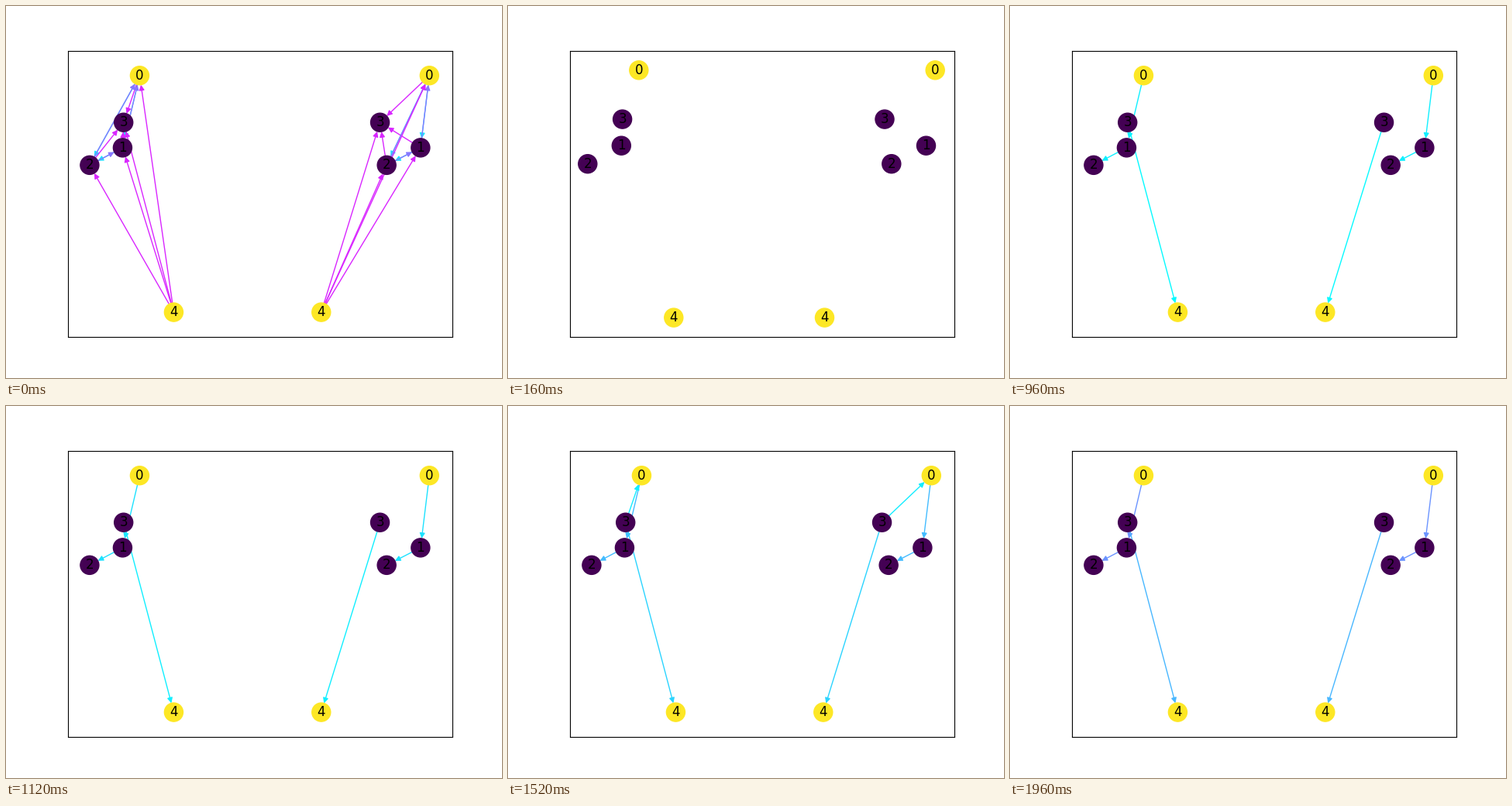
Recreate the animation shown at these times as a matplotlib script. Size 640 px wide and 480 px high, loop 2040 ms.

```python
from itertools import permutations

import numpy as np
import matplotlib.pyplot as plt
from matplotlib.animation import FuncAnimation
from matplotlib.patches import FancyArrowPatch

FRAMES, STEP = 51, 40
YELLOW, PURPLE = "#fde725", "#440154"
NODE_COLORS = [YELLOW, PURPLE, PURPLE, PURPLE, YELLOW]
NODE_SIZE = 300
FADE = 0.22
REGROW = 22

# Node positions in stage pixels, y pointing down
NODE_Y = [82.8, 180.2, 203.7, 146.1, 402.1]
GRAPHS = [np.column_stack([xs, NODE_Y]) for xs in (
    [168.8, 146.3, 102.8, 147.6, 213.8],
    [551.2, 539.5, 494.8, 486.0, 408.5],
)]


def start_strength(a, b):
    if a == 4 or b == 3:
        return 0.85
    return 0.11 if a < b else 0.53


def fading(n):
    """Every node but 3 links to all except 4, losing strength each frame."""
    links = {(a, b): start_strength(a, b) - FADE * n
             for a, b in permutations(range(5), 2) if a != 3 and b != 4}
    return {link: w for link, w in links.items() if w > 0}


def growing(n):
    """Links come back one by one; 3 to 0 is only a short pulse."""
    age = n - REGROW
    links = {}
    if age >= 1:
        links[0, 1] = links[1, 2] = 0.03 + 0.0145 * age
    if 14 <= age <= 20:
        links[3, 0] = 0.08 * np.sin(np.pi * (age - 13) / 8)
    if age >= 0:
        links[3, 4] = 0.0105 * age
    return links


def fit(points, links):
    """Move the nodes as the view widens to hold the links."""
    if not links:
        return points
    x, y = points.T
    if set(links) == {(3, 4)}:
        return np.column_stack([x, np.interp(y, [82.8, 402.1], [83, 397.9])])
    return np.column_stack([np.interp(x, [102.8, 551.2], [107.9, 546.3]),
                            np.interp(y, [82.8, 402.1], [89.7, 395.1])])


def draw_graph(points, links):
    shrink = np.sqrt(NODE_SIZE) / 2
    for (a, b), w in links.items():
        ax.add_patch(FancyArrowPatch(
            points[a], points[b], arrowstyle="-|>", mutation_scale=10,
            shrinkA=shrink, shrinkB=shrink, linewidth=1,
            color=plt.cm.cool(float(w)), zorder=1))
    ax.scatter(*points.T, s=NODE_SIZE, c=NODE_COLORS, zorder=2)
    for i, (x, y) in enumerate(points):
        ax.text(x, y, str(i), size=12, ha="center", va="center", zorder=3)


def draw(n):
    ax.clear()
    ax.set(xlim=(80, 576), ylim=(427.2, 57.6), xticks=[], yticks=[])
    # The last frame holds the one before it
    links = fading(n) if n < REGROW else growing(min(n, FRAMES - 2))
    for points in GRAPHS:
        draw_graph(fit(points, links), links)
    return []


plt.rcParams["font.family"] = "DejaVu Sans"
fig = plt.figure(figsize=(6.4, 4.8), dpi=100, facecolor="white")
ax = fig.add_axes([0.125, 0.11, 0.775, 0.77])

anim = FuncAnimation(fig, draw, frames=FRAMES, interval=STEP,
                     init_func=lambda: draw(0), repeat=True, repeat_delay=0)
plt.show()
```
